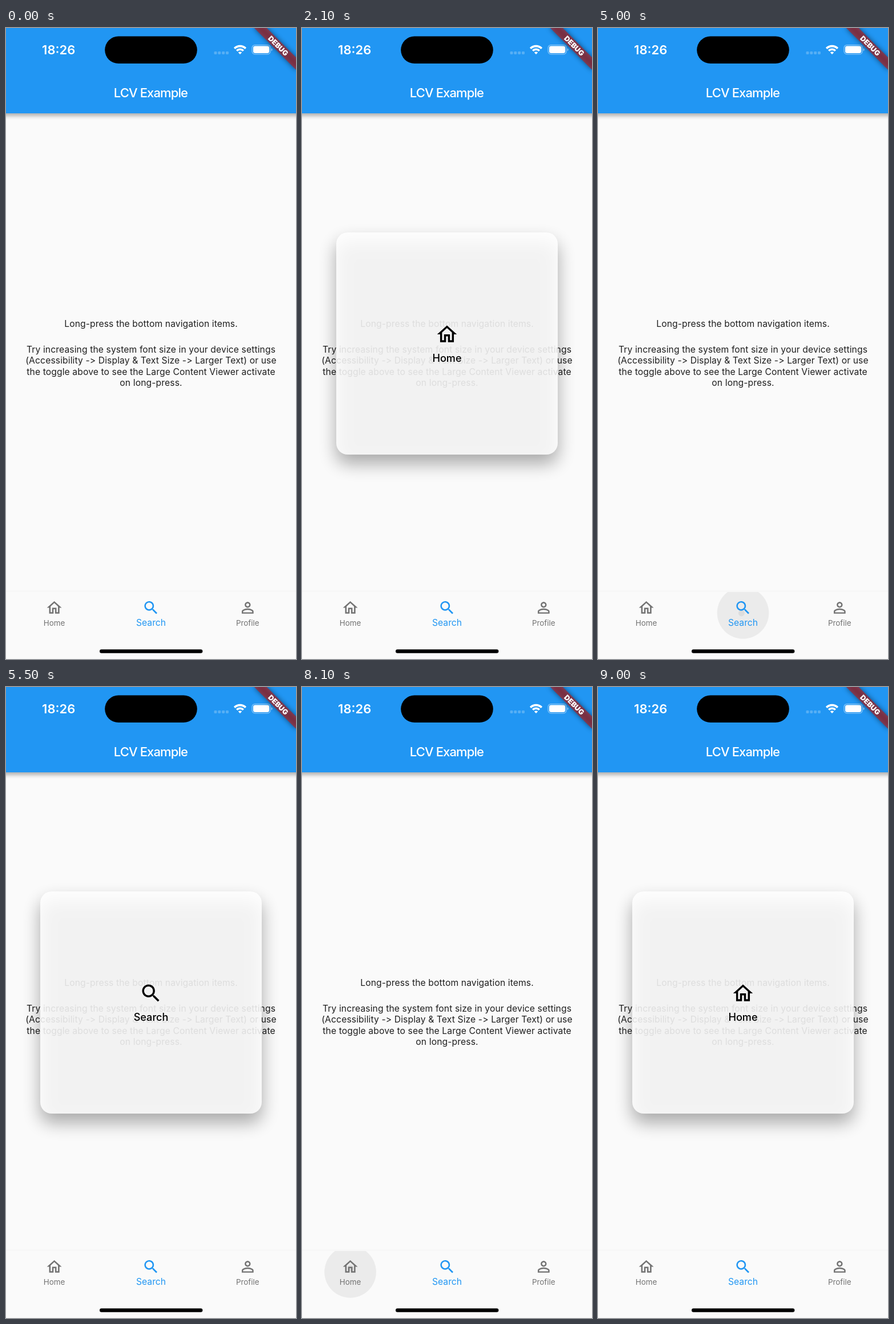
Animation, 508 px wide and 1102 px high, one loop 9700 ms. Source, as an HTML page:

```html
<!DOCTYPE html>
<html lang="en">
<head>
<meta charset="utf-8">
<title>Large content viewer</title>
<style>
  html, body { margin: 0; width: 100%; height: 100%; overflow: hidden; background: #fafafa; }
  svg { display: block; width: 100%; height: 100%; }
  text { font-family: Inter, Roboto, sans-serif; text-anchor: middle; }
  .body { font-size: 15.7px; letter-spacing: .1px; fill: #1f1f1f; font-variant-ligatures: none; font-feature-settings: "calt" 0; }
  .nav { font-size: 13.4px; fill: #737373; }
  .nav.on { font-size: 15.7px; fill: #2196f3; }
</style>
</head>
<body>
<svg viewBox="0 0 508 1102">
  <defs>
    <path id="home" d="M12 5.69l5 4.5V18h-2v-6H9v6H7v-7.81l5-4.5M12 3L2 12h3v8h6v-6h2v6h6v-8h3L12 3z"/>
    <path id="search" d="M15.5 14h-.79l-.28-.27C15.41 12.59 16 11.11 16 9.5 16 5.91 13.09 3 9.5 3S3 5.91 3 9.5 5.91 16 9.5 16c1.61 0 3.09-.59 4.23-1.57l.27.28v.79l5 4.99L20.49 19l-4.99-5zm-6 0C7.01 14 5 11.99 5 9.5S7.01 5 9.5 5 14 7.01 14 9.5 11.99 14 9.5 14z"/>
    <path id="profile" d="M12 5.9c1.16 0 2.1.94 2.1 2.1s-.94 2.1-2.1 2.1S9.9 9.16 9.9 8s.94-2.1 2.1-2.1m0 9c2.97 0 6.1 1.46 6.1 2.1v1.1H5.9V17c0-.64 3.13-2.1 6.1-2.1M12 4C9.79 4 8 5.79 8 8s1.79 4 4 4 4-1.79 4-4-1.79-4-4-4zm0 9c-2.67 0-8 1.34-8 4v3h16v-3c0-2.66-5.33-4-8-4z"/>
    <filter id="barBlur" filterUnits="userSpaceOnUse" x="-30" y="100" width="570" height="90"><feGaussianBlur stdDeviation="3.6"/></filter>
    <filter id="cardBlur" filterUnits="userSpaceOnUse" x="0" y="300" width="508" height="540"><feGaussianBlur stdDeviation="15.6"/></filter>
    <filter id="ribbonBlur" filterUnits="userSpaceOnUse" x="-80" y="10" width="160" height="70"><feGaussianBlur stdDeviation="5"/></filter>
    <clipPath id="navClip"><rect y="985" width="508" height="117"/></clipPath>
  </defs>

  <rect width="508" height="1102" fill="#fafafa"/>

  <g class="body">
    <text x="254" y="521.5">Long-press the bottom navigation items.</text>
    <text x="254" y="566.7">Try increasing the system font size in your device settings</text>
    <text x="254" y="586.1">(Accessibility -&gt; Display &amp; Text Size -&gt; Larger Text) or use</text>
    <text x="254" y="605.5">the toggle above to see the Large Content Viewer activate</text>
    <text x="254" y="624.9">on long-press.</text>
  </g>

  <!-- app bar -->
  <rect x="-12" y="120" width="532" height="33.5" opacity=".3" filter="url(#barBlur)"/>
  <rect width="508" height="149" fill="#2196f3"/>
  <text x="253.5" y="121" font-size="22" font-weight="500" letter-spacing="-.88" fill="#fff">LCV Example</text>

  <!-- bottom navigation -->
  <rect y="982" width="508" height="3" fill="#f7f7f7"/>
  <rect y="985" width="508" height="117" fill="#fafafa"/>
  <g clip-path="url(#navClip)">
    <circle id="glow" cy="1021.5" r="45.3" fill="#bcbcbc"/>
    <circle id="splash" fill="#c8c8c8"/>
  </g>
  <use href="#home" transform="translate(69.1 997) scale(1.293)" fill="#737373"/>
  <use href="#search" transform="translate(238.5 997) scale(1.293)" fill="#2196f3"/>
  <use href="#profile" transform="translate(407.8 997) scale(1.293)" fill="#737373"/>
  <text class="nav" x="84.6" y="1044">Home</text>
  <text class="nav on" x="254" y="1043.5">Search</text>
  <text class="nav" x="423.3" y="1044">Profile</text>

  <!-- large content card -->
  <g id="card">
    <rect x="60" y="373" width="388" height="388" rx="20" opacity=".32" filter="url(#cardBlur)"/>
    <rect x="60" y="357" width="388" height="388" rx="20" fill="#fff" opacity=".855"/>
    <use id="cardIcon" transform="translate(233.3 514.3) scale(1.724)"/>
    <text id="cardLabel" x="254" y="583" font-size="18.1" font-weight="500"></text>
  </g>

  <!-- status bar -->
  <text x="92.2" y="46" font-size="22" font-weight="600" fill="#fff">18:26</text>
  <rect x="173.2" y="14.5" width="161.6" height="47.6" rx="23.8"/>
  <g fill="#fff" opacity=".24">
    <rect x="364.5" y="41" width="5" height="5" rx="1.4"/>
    <rect x="371.3" y="41" width="5" height="5" rx="1.4"/>
    <rect x="378.2" y="41" width="5" height="5" rx="1.4"/>
    <rect x="385" y="41" width="5" height="5" rx="1.4"/>
  </g>
  <g fill="none" stroke="#fff">
    <path d="M400.2 35.7a13.9 13.9 0 0 1 19.6 0" stroke-width="3.7"/>
    <path d="M404.2 39.7a8.2 8.2 0 0 1 11.6 0" stroke-width="3.6"/>
    <path d="M410 46l-3.2-3.3a4.6 4.6 0 0 1 6.4 0z" fill="#fff" stroke="none"/>
    <rect x="431.1" y="29.6" width="32" height="16.2" rx="5" stroke-width="1.3" opacity=".45"/>
  </g>
  <rect x="433" y="31.5" width="28.2" height="12.4" rx="3.4" fill="#fff"/>
  <path d="M464.6 35.2q2.2 .9 2.2 2.5t-2.2 2.5z" fill="#fff" opacity=".5"/>

  <!-- corner ribbon -->
  <g transform="translate(508 0) rotate(45)">
    <rect x="-51.7" y="36.2" width="103.4" height="15.5" opacity=".5" filter="url(#ribbonBlur)"/>
    <rect x="-51.7" y="36.2" width="103.4" height="15.5" fill="#b71c1c" opacity=".627"/>
    <text y="48.5" font-size="12.5" font-weight="900" fill="#fff">DEBUG</text>
  </g>

  <rect x="164" y="1085.2" width="180.4" height="6.5" rx="3.25"/>
</svg>
<script>
const LOOP = 9700, INK_FADE = 200, SPLASH_GROW = 1000, CARD_FADE = 240;
// Each long press: ink starts, card opens (ink is cancelled), card closes.
const home = { icon: '#home', label: 'Home', x: 84.6, touch: [85, 1014] };
const search = { icon: '#search', label: 'Search', x: 254, touch: [251, 1022] };
const presses = [
  { item: home, ink: 1360, open: 1800, close: 3100 },
  { item: search, ink: 4880, open: 5260, close: 6600 },
  { item: home, ink: 7980, open: 8400, close: LOOP }
];

const $ = id => document.getElementById(id);
const glow = $('glow'), splash = $('splash'), card = $('card');
const clamp = v => Math.max(0, Math.min(1, v));
const mix = (a, b, k) => a + (b - a) * k;
const set = (el, attrs) => { for (const k in attrs) el.setAttribute(k, attrs[k]); };

function draw(t) {
  const press = presses.find(p => t >= p.ink && t < p.close);
  for (const el of [glow, splash, card]) el.style.display = press ? '' : 'none';
  if (!press) return;

  const { item, ink, open } = press;
  const fade = 1 - clamp((t - open) / INK_FADE);
  const grow = clamp((t - ink) / SPLASH_GROW);
  set(glow, { cx: item.x, opacity: .4 * clamp((t - ink) / INK_FADE) * fade });
  set(splash, {
    cx: mix(item.touch[0], item.x, grow),
    cy: mix(item.touch[1], 1021.5, grow),
    r: 45.3 * grow,
    opacity: .4 * fade
  });

  const k = clamp((t - open) / CARD_FADE);
  set(card, { opacity: k * (2 - k) });
  set($('cardIcon'), { href: item.icon });
  $('cardLabel').textContent = item.label;
}

let start;
function tick(now) {
  start ??= now;
  draw((now - start) % LOOP);
  requestAnimationFrame(tick);
}
draw(0);
requestAnimationFrame(tick);
</script>
</body>
</html>
```
